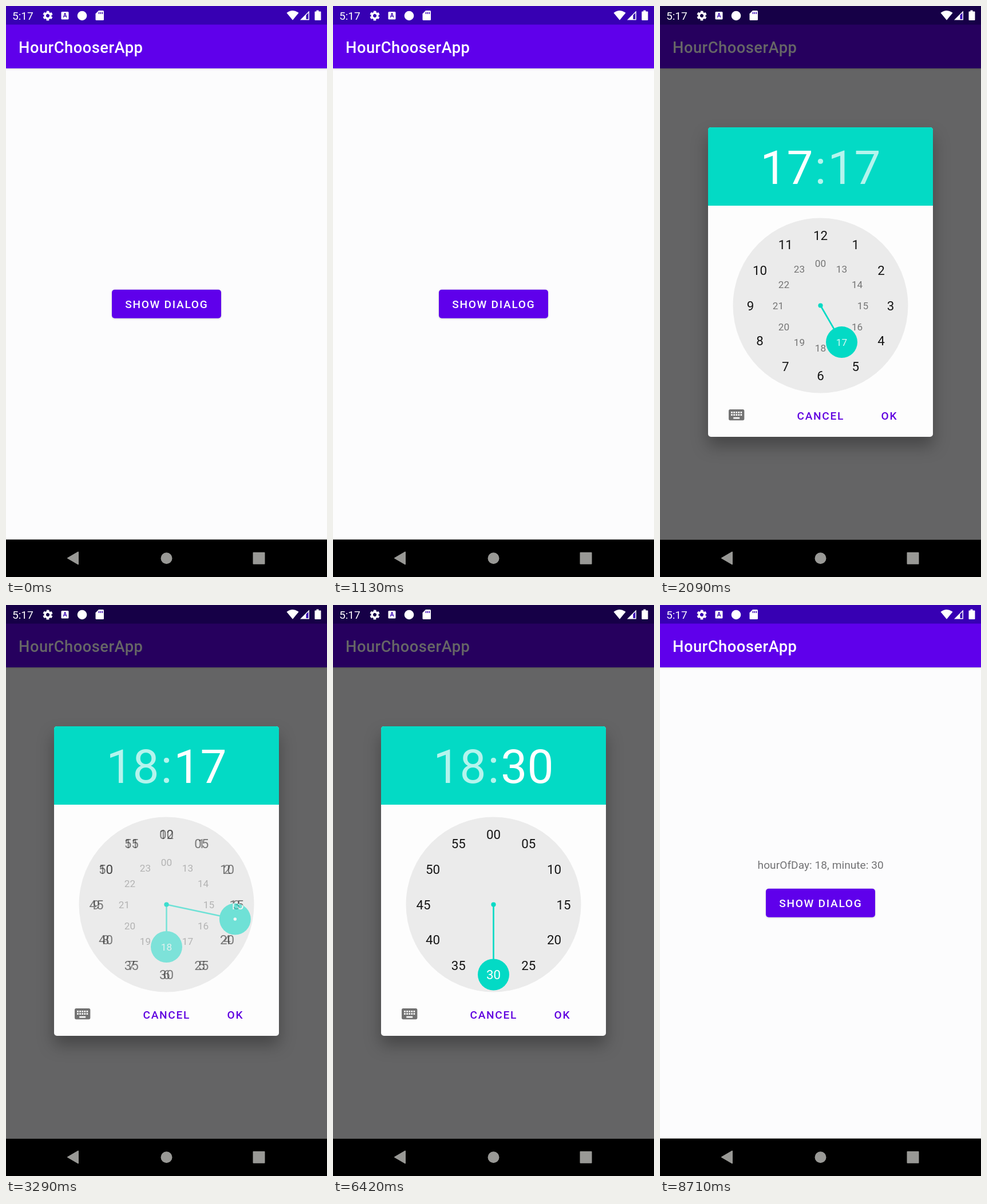
Recreate the animation shown at these times as an HTML page. Size 561x998 px, loop 8.75 s.

```html
<!DOCTYPE html>
<html lang="en">
<head>
<meta charset="utf-8">
<title>Time picker</title>
<style>
  html, body { margin: 0; width: 100%; height: 100%; overflow: hidden; background: #000; }
  svg { display: block; width: 561px; height: 998px; font-family: Roboto, sans-serif; }
  .btn { font-size: 19.1px; font-weight: 500; letter-spacing: 1.7px; }
  .mid { text-anchor: middle; }
  .bar { filter: drop-shadow(0 1.5px 1.5px rgba(0, 0, 0, .18)); }
  #dialog { transform-origin: 280.5px 482.5px; }
  #card { filter: drop-shadow(0 16px 14px rgba(0, 0, 0, .3)); }
  #head { font-size: 82px; fill: #fff; }
</style>
</head>
<body>
<svg viewBox="0 0 561 998">
  <rect width="561" height="998" fill="#fcfcfd"/>
  <rect class="bar" y="32" width="561" height="77" fill="#5f00eb"/>
  <rect width="561" height="32.5" fill="#3700b3"/>
  <text x="22" y="81.5" font-size="27.3" font-weight="500" letter-spacing=".5" fill="#fff">HourChooserApp</text>
  <text id="result" class="mid" x="280.7" y="460.5" font-size="19.1" letter-spacing=".05" fill="#727274">hourOfDay: 18, minute: 30</text>
  <rect class="bar" x="185" y="495.7" width="191" height="50" rx="5" fill="#5f00eb"/>
  <text class="btn" x="208.2" y="528.4" fill="#fff">SHOW DIALOG</text>

  <rect id="dim" width="561" height="932.5"/>

  <g fill="#fff">
    <text x="11" y="24" font-size="19.1">5:17</text>
    <g transform="translate(73 17) rotate(30)" fill="none" stroke="#fff">
      <circle r="4.8" stroke-width="3.6"/>
      <circle r="7.2" stroke-width="2.8" stroke-dasharray="4.4 3.14" stroke-dashoffset="2.2"/>
    </g>
    <rect x="96.5" y="10" width="13" height="13.5" rx="1.5"/>
    <text class="mid" x="103" y="20" font-size="10" font-weight="700" fill="#3700b3">A</text>
    <circle cx="133" cy="17" r="8.3"/>
    <path d="M162 8h7.5q1.5 0 1.5 1.5v14q0 1.5-1.5 1.5h-11.5q-1.5 0-1.5-1.5v-10z"/>
    <path d="M162.5 10.5v3.500m3-3.5v3.5m3-3.5v3.5" stroke="#3700b3" stroke-width="1.5"/>
    <path d="M490.5 12q10.5-8 21 0l-10.5 12.7z"/>
    <path d="M530 8.5v16h-16z"/>
    <path d="M524.5 16v7h4v-11z" fill="#3700b3"/>
    <path d="M542.5 7.5h4v2h3q1 0 1 1v13.500q0 1-1 1h-9q-1 0-1-1v-13.5q0-1 1-1h2z"/>
  </g>

  <rect y="932.5" width="561" height="66"/>
  <g fill="#999996" stroke="#999996" stroke-width="2" stroke-linejoin="round">
    <path d="M108 965l18-10.5v21z"/>
    <circle cx="280.5" cy="965.3" r="9"/>
    <rect x="432.5" y="955.7" width="19" height="19"/>
  </g>

  <g id="dialog">
    <rect id="card" x="84" y="212" width="393" height="541" rx="5" fill="#fdfdfd"/>
    <path d="M84 349V217q0-5 5-5h383q5 0 5 5v132z" fill="#03dac5"/>
    <g id="head">
      <text id="hour" x="267.5" y="310.5" text-anchor="end"></text>
      <text class="mid" x="280.5" y="310.5" opacity=".7">:</text>
      <text id="minute" x="293.3" y="310.5"></text>
    </g>
    <circle cx="280.5" cy="523.5" r="153" fill="#ebebeb"/>
    <g id="dials" transform="translate(280.5 523.5)"></g>
    <path id="keys" transform="translate(117.3 698.2) scale(1.365)" fill="#737373" fill-rule="evenodd"/>
    <g class="btn" fill="#5f00e0">
      <text x="239.5" y="722.5">CANCEL</text>
      <text x="386.5" y="722.5">OK</text>
    </g>
  </g>
</svg>
<script>
const LOOP = 8750, OPEN = 1430, PICK_HOUR = 3000, TO_MINUTES = 3080, PICK_MINUTE = 5100, CLOSE = 6540;
const OUTER = 122.5, INNER = 74;
const $ = id => document.getElementById(id);
const pad = n => String(n).padStart(2, "0");
const ramp = (t, start, length) => Math.max(0, Math.min(1, (t - start) / length));
const easeOut = p => 1 - (1 - p) ** 3;

// Twelve labels around the dial
function ring(label, radius, size, color) {
  let out = "";
  for (let i = 0; i < 12; i++) {
    const a = i * Math.PI / 6;
    out += `<text x="${radius * Math.sin(a)}" y="${-radius * Math.cos(a) + size * .36}" font-size="${size}" fill="${color}">${label(i)}</text>`;
  }
  return out;
}

// Labels turn light where the selector covers them
function makeDial(id, labels) {
  $("dials").insertAdjacentHTML("beforeend", `<g id="${id}" class="mid">
    <clipPath id="${id}Clip"><circle class="knob" r="27.5"/></clipPath>
    ${labels("#151515", "#757575")}
    <g fill="#03dac5"><line class="hand" stroke="#03dac5" stroke-width="2.7"/>
    <circle r="4.1"/><circle class="knob" r="27.5"/></g>
    <g clip-path="url(#${id}Clip)">${labels("#fff", "#d9f8f4")}</g>
    <circle class="knob dot" r="2.7" fill="#fff"/></g>`);
  const dial = $(id);
  return (angle, radius, dot, alpha) => {
    const x = radius * Math.sin(angle), y = -radius * Math.cos(angle);
    for (const knob of dial.querySelectorAll(".knob")) {
      knob.setAttribute("cx", x);
      knob.setAttribute("cy", y);
    }
    const hand = dial.querySelector(".hand");
    hand.setAttribute("x2", x);
    hand.setAttribute("y2", y);
    dial.querySelector(".dot").style.opacity = dot ? 1 : 0;
    dial.style.opacity = alpha;
  };
}

const setHours = makeDial("hours", (main, sub) =>
  ring(i => i || 12, OUTER, 22.3, main) + ring(i => i ? i + 12 : "00", INNER, 17.2, sub));
const setMinutes = makeDial("minutes", main => ring(i => pad(i * 5), OUTER, 22.3, main));

// Keyboard icon: rounded body with two rows of keys and a space bar
let keys = "M4 5h16q2 0 2 2v10q0 2-2 2H4q-2 0-2-2V7q0-2 2-2zM8 15h8v2H8z";
for (const y of [8, 11]) for (let x = 5; x < 18; x += 3) keys += `M${x} ${y}h2v2h-2z`;
$("keys").setAttribute("d", keys);

function draw(t) {
  $("dim").style.opacity = .6 * ramp(t, OPEN, 200) * (1 - ramp(t, CLOSE, 200));
  $("dialog").style.opacity = ramp(t, OPEN, 150) * (1 - ramp(t, CLOSE, 150));
  $("dialog").style.transform = `scale(${.9 + .1 * easeOut(ramp(t, OPEN, 220))})`;
  $("result").style.opacity = t >= CLOSE ? 1 : 0;

  const hour = t < PICK_HOUR ? 17 : 18;
  const minute = t < PICK_MINUTE ? 17 : 30;
  const onMinutes = t >= TO_MINUTES;
  $("hour").textContent = hour;
  $("minute").textContent = pad(minute);
  $("hour").style.opacity = onMinutes ? .7 : 1;
  $("minute").style.opacity = onMinutes ? 1 : .7;

  const fade = ramp(t, TO_MINUTES, 400);
  setHours(hour * Math.PI / 6, INNER, false, 1 - fade);
  setMinutes(minute * Math.PI / 30, OUTER, minute % 5 > 0, fade);
}

function tick() {
  draw(performance.now() % LOOP);
  requestAnimationFrame(tick);
}
tick();
</script>
</body>
</html>
```
